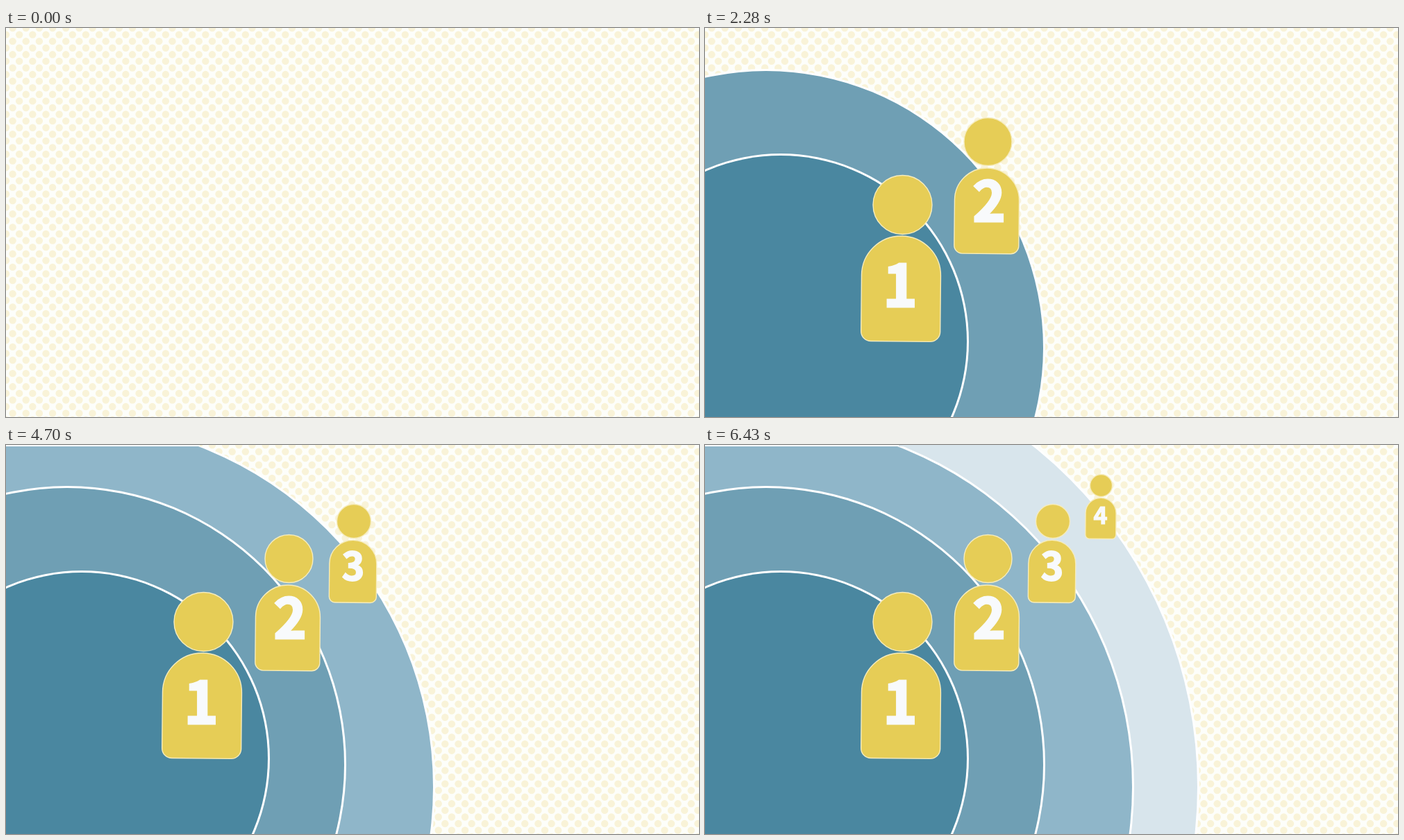
Recreate the animation shown at these times as an HTML page with a canvas. Size 998 px wide and 561 px high, loop 7200 ms.

```html
<!DOCTYPE html>
<html lang="en">
<head>
<meta charset="utf-8">
<title>Four rings</title>
<style>
html, body { margin: 0; width: 100%; height: 100%; overflow: hidden; background: #fdfefa; }
canvas { display: block; width: 998px; height: 561px; }
</style>
</head>
<body>
<canvas id="stage" width="998" height="561"></canvas>
<script>
const W = 998, H = 561, LOOP = 7200;
const ctx = document.getElementById('stage').getContext('2d');

// Each step adds one ring and one figure; y is the body's vertical centre.
const steps = [
  { at: 1080,
    ring: { x: 109, y: 452, r: 268, color: '#4a87a0' },
    person: { x: 282.3, y: 376, w: 114, h: 152, head: { x: 284.5, y: 255, r: 42.5 } },
    digit: { text: '1', x: 281, y: 401.5, size: 84, bold: 3 } },
  { at: 2280,
    ring: { x: 88, y: 461, r: 399, color: '#6f9fb4' },
    person: { x: 405.8, y: 263.7, w: 93, h: 123.5, head: { x: 407.5, y: 164, r: 34.5 } },
    digit: { text: '2', x: 409, y: 279, size: 80, bold: 3 } },
  { at: 3840,
    ring: { x: 89.4, y: 493, r: 525.6, color: '#8fb6c9', top: 2 },
    person: { x: 499.7, y: 182.3, w: 68, h: 90, head: { x: 501, y: 110, r: 24.5 } },
    digit: { text: '3', x: 500, y: 194.5, size: 55, bold: 2 } },
  { at: 5280,
    ring: { x: 81, y: 493, r: 628, color: '#d8e5ec' },
    person: { x: 570, y: 105.8, w: 44, h: 59, head: { x: 570.5, y: 58.5, r: 16 } },
    digit: { text: '4', x: 569.5, y: 113.5, size: 34, bold: 1.2 } }
];

function disc(x, y, r) {
  ctx.beginPath();
  ctx.arc(x, y, r, 0, Math.PI * 2);
}

function drawDots() {
  const pitch = 9.58;
  ctx.fillStyle = '#fdfefa';
  ctx.fillRect(0, 0, W, H);
  ctx.fillStyle = '#f9f3d8';
  for (let j = 0; j * pitch < H + 6; j++) {
    for (let i = (j + 1) % 2; i * pitch < W + 6; i += 2) {
      disc(i * pitch, j * pitch, 5.2);
      ctx.fill();
    }
  }
}

function drawRing({ x, y, r, color, top = 0 }) {
  ctx.save();
  if (top) {
    ctx.fillStyle = '#fff';
    ctx.fillRect(0, 0, 279, top);
    ctx.beginPath();
    ctx.rect(0, top, W, H);
    ctx.clip();
  }
  disc(x, y, r + 3);
  ctx.fillStyle = '#fff';
  ctx.fill();
  disc(x, y, r);
  ctx.fillStyle = color;
  ctx.fill();
  ctx.restore();
}

function drawPerson({ x, y, w, h, head }) {
  ctx.fillStyle = '#e6cd56';
  ctx.strokeStyle = '#f6ecbc';
  ctx.lineWidth = 1.4;
  disc(head.x, head.y, head.r);
  ctx.fill();
  ctx.stroke();

  ctx.save();
  ctx.translate(x, y);
  ctx.rotate(0.01);
  const arch = w / 2, corner = w * 0.125;
  ctx.beginPath();
  ctx.roundRect(-w / 2, -h / 2, w, h, [arch, arch, corner, corner]);
  ctx.fill();
  ctx.stroke();
  ctx.restore();
}

function drawDigit({ text, x, y, size, bold }) {
  ctx.font = `bold ${size}px "Noto Sans CJK JP", "Noto Sans CJK SC", "Noto Sans CJK", "Noto Sans", sans-serif`;
  ctx.textAlign = 'center';
  ctx.textBaseline = 'alphabetic';
  ctx.fillStyle = ctx.strokeStyle = '#f8fafc';
  ctx.lineWidth = bold;
  ctx.lineJoin = 'miter';
  ctx.miterLimit = 3;
  ctx.fillText(text, x, y);
  ctx.strokeText(text, x, y);
}

function draw(t) {
  const shown = steps.filter(s => t >= s.at);
  drawDots();
  [...shown].reverse().forEach(s => drawRing(s.ring));
  for (const s of shown) {
    drawPerson(s.person);
    drawDigit(s.digit);
  }
}

function tick() {
  draw(performance.now() % LOOP);
  requestAnimationFrame(tick);
}
tick();
</script>
</body>
</html>
```
